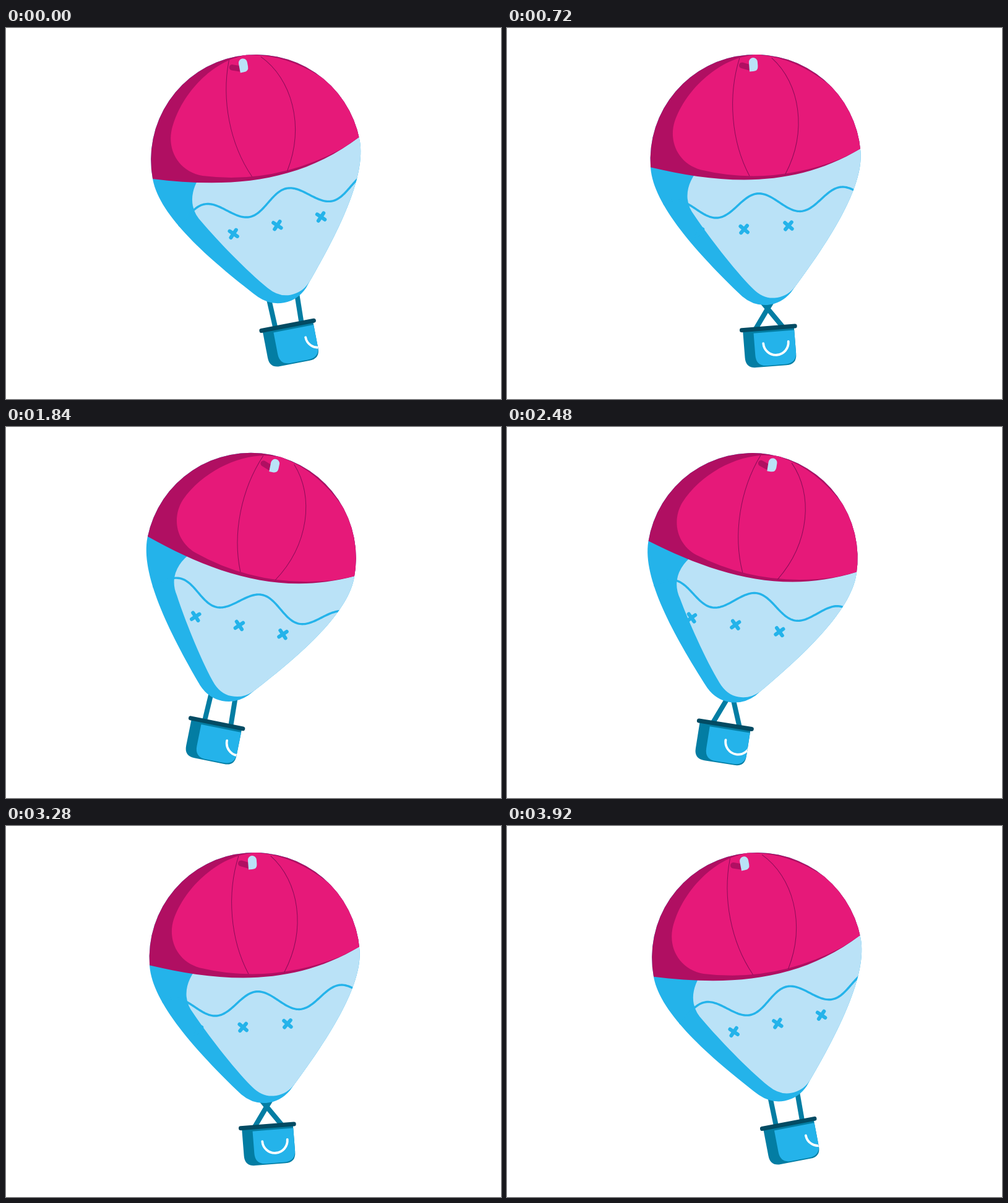
Animation, 800 px wide and 600 px high, one loop 3.96 s. Source, as an HTML page with a canvas:

```html
<!DOCTYPE html>
<html lang="en">
<head>
<meta charset="utf-8">
<title>Hot-air balloon</title>
<style>
html, body { margin: 0; width: 100%; height: 100%; overflow: hidden; background: #fff; }
canvas { display: block; }
</style>
</head>
<body>
<canvas id="stage" width="800" height="600"></canvas>
<script>
const ctx = document.getElementById('stage').getContext('2d');
const LOOP = 3960, HALF = 2000, STEP = 40;
const PIVOT = { x: 403, y: 190 }, HANG = 5;
const PINK = '#e61979', PLUM = '#b00f62', SEAM = '#8a0c58';
const PALE = '#bae2f7', BLUE = '#24b3ea', TEAL = '#037da3', NAVY = '#024b63';

// Keys: [progress of the half swing, value, slope]
const swing = [[0, -10.9, 0], [.36, -4.5, 33.5], [.6, 3.5, 34], [.76, 9, 25], [.92, 11.4, 8], [1, 11.7, 0]];
const drift = [[0, 82.3, 0], [.36, 41.6, -150], [.6, 36.7, 115], [.76, 59, 130], [.92, 72.3, 40], [1, 74, 0]];
const turn = [[0, 41.3, 0], [.36, 6.4, -105], [.6, 3.5, 75], [.76, 20.8, 120], [.92, 38, 50], [1, 40.5, 0]];

// Cubic Hermite interpolation
function at(keys, u) {
  let i = 0;
  while (i < keys.length - 2 && u > keys[i + 1][0]) i++;
  const [x0, y0, m0] = keys[i], [x1, y1, m1] = keys[i + 1];
  const h = x1 - x0, t = (u - x0) / h, t2 = t * t, t3 = t2 * t;
  const e = 3 * t2 - 2 * t3;
  return y0 + (y1 - y0) * e + h * (m0 * (t3 - 2 * t2 + t) + m1 * (t3 - t2));
}

// Local coordinates: y counts from HANG below the pivot
const envelope = new Path2D(`M-173.2 18 A170.2 170.2 0 0 1 167.2 18
  C167.2 78 104 160 37 236.5 Q20 253.5 -2.6 253.5 Q-25 253.5 -42 236.5 C-110 160 -173.2 78 -173.2 18Z`);
const crown = new Path2D('M-190 16.6 H-173.3 C-60 53 54 70 167.6 13.3 H190 V-170 H-190Z');
const crownLight = new Path2D(`M5 -151 C-45 -150 -105 -108 -129 -53 C-141 -22 -128 14 -93 27
  Q18 63 135 27 L190 5 V-95 H124 Q74 -140.5 20 -150 L15 -160Z`);
const skirtLight = new Path2D(`M-90 20 Q-118 45 -117.7 72 Q-117.5 87 -108 101 C-90 133 -52 192 -24 225
  Q-9 243 10 243 Q29 243 42 230 L75 200 L190 150 V0Z`);
const seams = new Path2D('M-16 -148 C-40 -88 -40 -15 -15 43 M36 -144 C78 -100 85 -22 43 45');
const basket = new Path2D('M-45.3 291 H37.6 V336 Q37.6 353 20.6 353 H-28.3 Q-45.3 353 -45.3 336Z');
const basketFront = new Path2D('M-28.3 297.5 H37.6 V333 Q37.6 351.3 18 351.3 H-10 Q-28.3 351.3 -28.3 333Z');
const valve = new Path2D('M-1.5 -125 V-140 A7 7 0 0 1 12.5 -140 V-133 Q12.5 -125 4.5 -125Z');

function fill(path, color) {
  ctx.fillStyle = color;
  ctx.fill(path);
}

function stroke(path, color, width, cap = 'round') {
  ctx.strokeStyle = color;
  ctx.lineWidth = width;
  ctx.lineCap = cap;
  ctx.stroke(path);
}

function clipped(path, paint) {
  ctx.save();
  ctx.clip(path);
  paint();
  ctx.restore();
}

function line(x0, y0, x1, y1) {
  return new Path2D(`M${x0} ${y0} L${x1} ${y1}`);
}

function drawRopes(spread) {
  stroke(line(-2.5 - spread, 245, -24, 290), TEAL, 8, 'butt');
  stroke(line(-2.5 + spread, 245, 19, 290), TEAL, 8, 'butt');
}

function drawBasket(smileX) {
  fill(basket, TEAL);
  fill(basketFront, BLUE);
  clipped(basketFront, () => {
    const smile = new Path2D();
    smile.arc(smileX, 315, 20.3, 0, Math.PI);
    stroke(smile, '#fff', 3.8);
  });
  stroke(line(-46.9, 291, 39.1, 291), NAVY, 7);
}

function drawPattern(offset) {
  const wave = new Path2D();
  for (let x = -180; x <= 180; x += 2) {
    wave.lineTo(x, 89.7 - 17 * Math.cos(2 * Math.PI * (x - offset + 45.6) / 135.5));
  }
  stroke(wave, BLUE, 3.4);
  for (let i = 0; i < 3; i++) {
    const x = offset - 72 * i, y = 128.5, d = 5.3;
    stroke(line(x - d, y - d, x + d, y + d), BLUE, 6);
    stroke(line(x - d, y + d, x + d, y - d), BLUE, 6);
  }
}

function drawEnvelope(offset) {
  fill(envelope, BLUE);
  clipped(envelope, () => {
    fill(skirtLight, PALE);
    drawPattern(offset);
    fill(crown, PLUM);
    clipped(crown, () => fill(crownLight, PINK));
    stroke(seams, SEAM, 1);
  });
  stroke(line(-13, -136, 2, -130.5), PLUM, 9.5);
  fill(valve, PALE);
}

function draw() {
  const t = Math.floor(performance.now() % LOOP / STEP) * STEP;
  const u = 1 - Math.abs(t - HALF) / HALF;
  const smileX = at(turn, u);
  ctx.clearRect(0, 0, 800, 600);
  ctx.save();
  ctx.translate(PIVOT.x, PIVOT.y);
  ctx.rotate(at(swing, u) * Math.PI / 180);
  ctx.translate(0, HANG);
  drawRopes(.95 * smileX - 16.3);
  drawEnvelope(at(drift, u));
  drawBasket(smileX);
  ctx.restore();
  requestAnimationFrame(draw);
}
draw();
</script>
</body>
</html>
```
